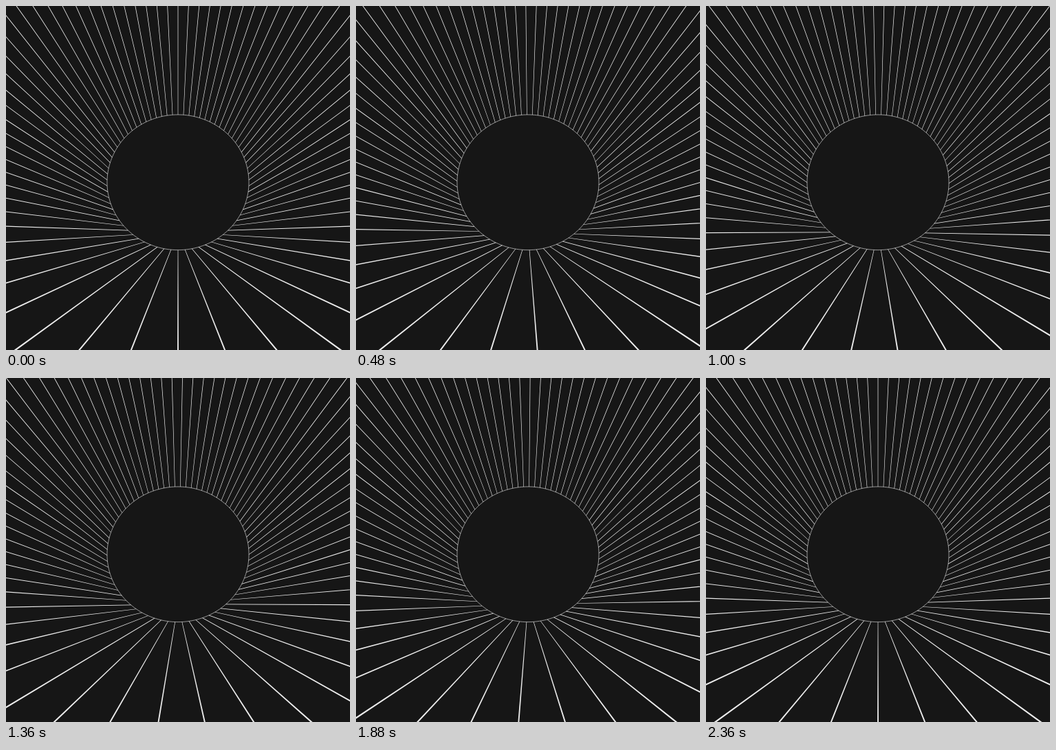
Animation, 500 px wide and 500 px high, one loop 2400 ms. Source, as an HTML page:

```html
<!DOCTYPE html>
<html lang="en">
<head>
<meta charset="utf-8">
<title>Tunnel of rays</title>
<style>
  html, body { margin: 0; width: 100%; height: 100%; overflow: hidden; background: #161616; }
  svg { display: block; width: 100vw; height: 100vh; }
</style>
</head>
<body>
<svg viewBox="0 0 500 500">
  <path id="rays" fill="#ececec"/>
  <path id="rim" fill="none" stroke="#ececec" stroke-width="0.6"/>
</svg>
<script>
  // Inside of a tilted unit cylinder, seen in perspective from near its floor.
  const FOCAL = 250, SIN = 0.3, COS = 0.954;
  const DROP = 0.787;   // eye offset from the axis
  const END = 2.315;    // distance of the far rim
  const NEAR = 0.15;    // depth where rays are cut, outside the stage
  const COUNT = 72, STEP = 40, STEPS = 60;
  const GAP = 2 * Math.PI / COUNT;

  const rays = document.getElementById('rays');
  const rim = document.getElementById('rim');

  function project(angle, dist) {
    const h = Math.cos(angle) - DROP;
    const depth = dist * COS - h * SIN;
    return {
      x: 250 + FOCAL * Math.sin(angle) / depth,
      y: 250 + FOCAL * (h * COS + dist * SIN) / depth,
      half: (0.4 + 0.5 / depth) / 2
    };
  }

  const pair = (x, y) => x.toFixed(2) + ' ' + y.toFixed(2);

  function ray(angle) {
    const nearDist = (NEAR + (Math.cos(angle) - DROP) * SIN) / COS;
    const a = project(angle, END), b = project(angle, nearDist);
    const len = Math.hypot(b.x - a.x, b.y - a.y);
    const nx = (a.y - b.y) / len, ny = (b.x - a.x) / len;
    const side = (p, s) => pair(p.x + s * nx * p.half, p.y + s * ny * p.half);
    return 'M' + [side(a, 1), side(b, 1), side(b, -1), side(a, -1)].join('L') + 'Z';
  }

  function rimPath() {
    const points = [];
    for (let i = 0; i < 180; i++) {
      const p = project(i * Math.PI / 90, END);
      points.push(pair(p.x, p.y));
    }
    return 'M' + points.join('L') + 'Z';
  }

  function draw(ms) {
    const step = Math.floor(ms / STEP) % STEPS;
    const turn = GAP * step / (STEPS - 1);
    let d = '';
    for (let i = 0; i < COUNT; i++) d += ray(i * GAP + turn);
    rays.setAttribute('d', d);
  }

  rim.setAttribute('d', rimPath());
  draw(0);

  let start;
  function tick(now) {
    if (start === undefined) start = now;
    draw(Math.max(0, now - start));
    requestAnimationFrame(tick);
  }
  requestAnimationFrame(tick);
</script>
</body>
</html>
```
